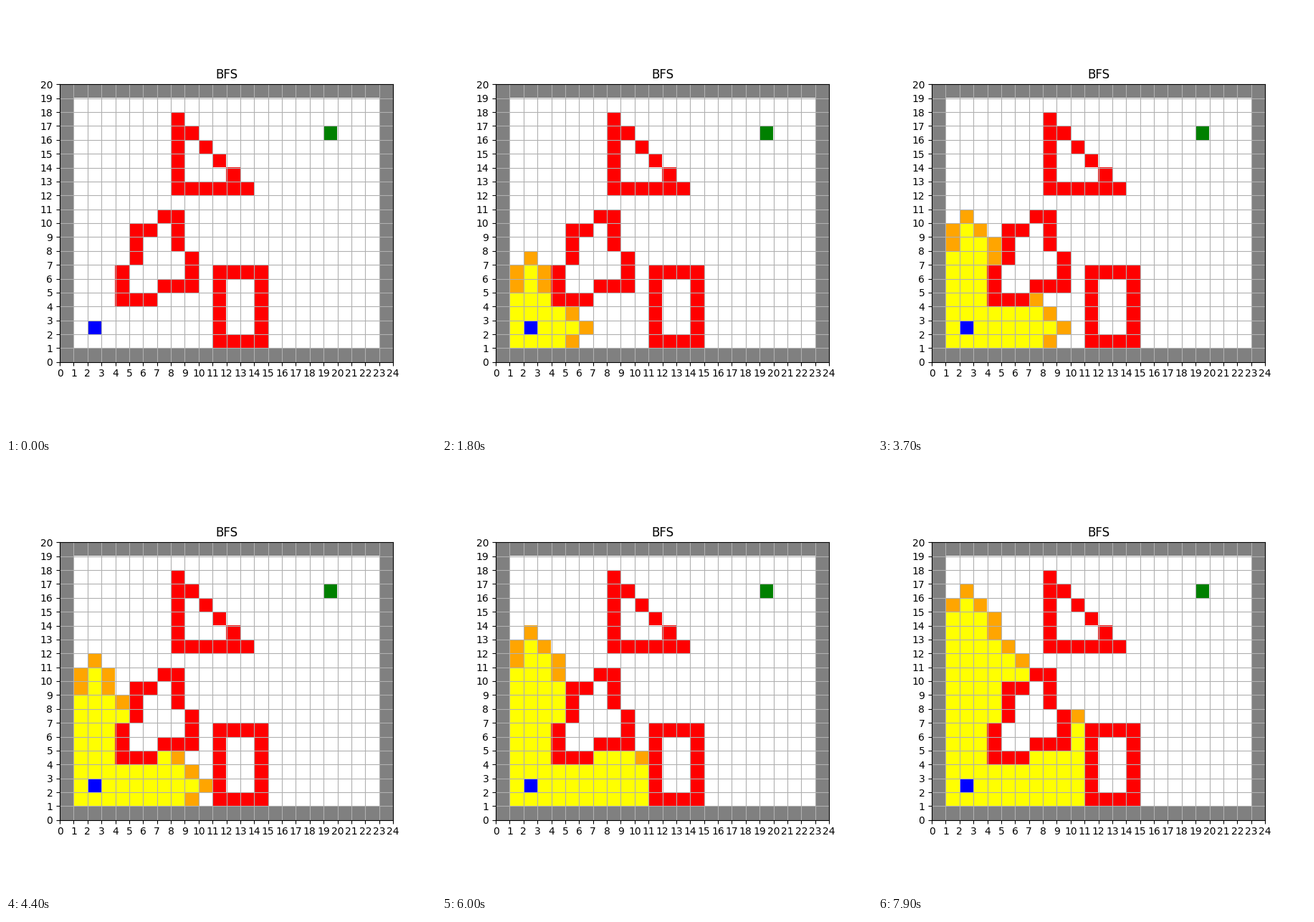
These frames come from a looping animation (600x600 px, 8 s). A matplotlib script:

```python
from itertools import product

import matplotlib.pyplot as plt
import numpy as np
from matplotlib.animation import FuncAnimation
from matplotlib.colors import to_rgb

W, H = 24, 20
START, GOAL = (2, 2), (19, 16)
STEPS = [(0, 1), (1, 0), (0, -1), (-1, 0)]  # up, right, down, left
FRAMES, INTERVAL = 80, 100


def column(x, low, high):
    return {(x, y) for y in range(low, high + 1)}


def row(y, low, high):
    return {(x, y) for x in range(low, high + 1)}


def build_obstacles():
    triangle = column(8, 12, 17) | row(12, 8, 13) | {(8 + i, 17 - i) for i in range(1, 5)}
    box = column(11, 1, 6) | column(14, 1, 6) | row(1, 11, 14) | row(6, 11, 14)
    blob = (row(10, 7, 8) | row(9, 5, 6) | column(8, 8, 10) | column(5, 7, 9)
            | column(9, 5, 7) | row(5, 7, 9) | column(4, 4, 6) | row(4, 4, 6))
    return triangle | box | blob


border = {(x, y) for x, y in product(range(W), range(H))
          if x in (0, W - 1) or y in (0, H - 1)}
obstacles = build_obstacles()


def paint(img, cells, color):
    for x, y in cells:
        img[y, x] = to_rgb(color)


def search(pops):
    """Breadth-first search: cells in discovery order after some expansions."""
    queue, seen = [START], {START}
    for i in range(pops):
        x, y = queue[i]
        for dx, dy in STEPS:
            cell = (x + dx, y + dy)
            if cell not in seen and cell not in border and cell not in obstacles:
                seen.add(cell)
                queue.append(cell)
    return queue


def render(pops):
    img = np.ones((H, W, 3))
    queue = search(pops)
    paint(img, border, "gray")
    paint(img, obstacles, "red")
    paint(img, queue[:pops], "yellow")
    paint(img, queue[pops:], "orange")
    paint(img, [START], "blue")
    paint(img, [GOAL], "green")
    return img


fig, ax = plt.subplots(figsize=(6, 6), dpi=100)
board = ax.imshow(render(0), origin="lower", extent=(0, W, 0, H), interpolation="nearest")
ax.set_xticks(range(W + 1))
ax.set_yticks(range(H + 1))
ax.grid(True)
ax.set_title("BFS")


def update(frame):
    board.set_data(render(frame))
    return [board]


anim = FuncAnimation(fig, update, frames=FRAMES, interval=INTERVAL,
                     repeat=True, repeat_delay=0)
plt.show()
```
